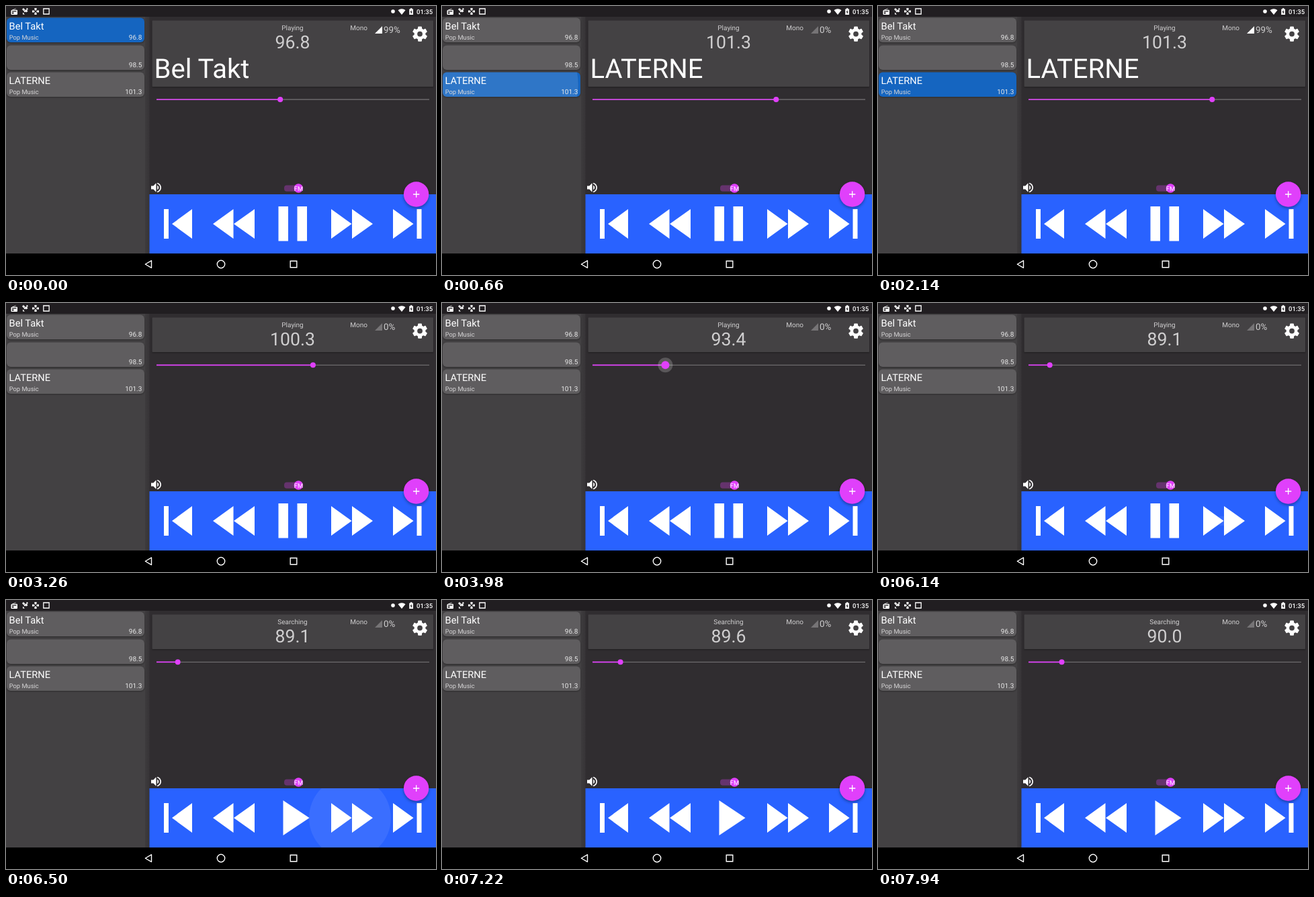
An HTML page for the animation above (8000 ms loop, 640 by 400 pixels).

```html
<!DOCTYPE html>
<html lang="en">
<head>
<meta charset="utf-8">
<title>Radio tuner</title>
<style>
  html, body { margin: 0; width: 100%; height: 100%; overflow: hidden; background: #000; }
  svg { display: block; width: 640px; height: 400px; font-family: Roboto, sans-serif; text-rendering: geometricPrecision; }
  .shadow { filter: drop-shadow(0 1px 1px rgba(0, 0, 0, .35)); }
</style>
</head>
<body>
<svg viewBox="0 0 640 400">
  <defs>
    <linearGradient id="edge">
      <stop offset="0" stop-color="#3d3b3d"/><stop offset="1" stop-color="#373437"/>
    </linearGradient>
    <clipPath id="barClip"><rect x="213" y="280" width="427" height="88"/></clipPath>
    <clipPath id="cardClip"><rect x="1" y="98.5" width="205" height="36.5" rx="6"/></clipPath>
  </defs>

  <rect width="640" height="400" fill="#302d30"/>
  <rect y="16" width="207" height="352" fill="#434143"/>
  <rect x="207" y="16" width="6.5" height="352" fill="url(#edge)"/>

  <!-- Status bar -->
  <rect width="640" height="16" fill="#211e21"/>
  <g fill="#fff">
    <path d="M8 6.2 14.5 3.4 14.8 4.1 10.8 5.8H16a1 1 0 0 1 1 1V12a1 1 0 0 1-1 1H8.500a1 1 0 0 1-1-1V7z"/>
    <circle cx="10.200" cy="10.500" r="1.300" fill="#211e21"/>
    <path d="M9 7.200h6.500v1.300H9z" fill="#211e21"/>
    <path d="M24 5l2-2 2.500 2.500-2 2zM28 7l2-2 2.500 2.500-2 2zM26.500 8l1.500-1.500 1.500 1.500L28 9.500zM30 4l1.500-1 1.500 1.500-1.500 1.500zM25 9.500l3 3h-3z"/>
    <path d="M42.400 3h3.200v2.500L44 7l-1.600-1.500zM42.400 13h3.200v-2.500L44 9l-1.600 1.500zM39 6.400v3.200h2.500L43 8l-1.500-1.600zM49 6.400v3.200h-2.500L45 8l1.500-1.600z"/>
    <path d="M55.800 4h8.400v8h-8.400z" fill="none" stroke="#fff" stroke-width="1.300"/>
    <circle cx="576" cy="8" r="2.800"/>
    <path d="M589 13 583.500 6.200a8.600 8.600 0 0 1 11 0z"/>
    <path d="M600.200 4.500h1.700V3.300h2.400v1.200H606V13h-5.800z"/>
    <path d="M603.500 6l-2 3.200h1.300V12l2-3.400h-1.300z" fill="#211e21"/>
    <text x="611" y="12" font-size="9.5" font-weight="500">01:35</text>
  </g>

  <g id="list"></g>
  <circle id="cardRipple" cx="100" cy="117" fill="#fff" clip-path="url(#cardClip)"/>

  <!-- Now playing -->
  <rect id="panel" class="shadow" x="217.500" y="21.500" width="418.500" rx="1" fill="#444244"/>
  <g fill="#cfcecf" font-size="10">
    <text id="state" x="426.500" y="36" text-anchor="middle"></text>
    <text x="512.300" y="36">Mono</text>
    <text id="frequency" x="426.500" y="63" font-size="26.67" text-anchor="middle"></text>
    <text id="percent" x="562" y="39.500" font-size="13.33"></text>
  </g>
  <path id="signal" d="M549 41h11V30z"/>
  <text id="station" x="220.500" y="107" font-size="40" fill="#fff"></text>
  <path transform="translate(602.700 28.200) scale(1.111)" fill="#fff" d="M19.430 12.980c.04-.32.07-.64.07-.98s-.03-.66-.07-.98l2.110-1.650c.19-.15.24-.42.12-.64l-2-3.460c-.12-.22-.39-.3-.61-.22l-2.490 1c-.52-.4-1.080-.73-1.690-.98l-.38-2.650A.49.490 0 0 0 14 2h-4c-.25 0-.46.18-.49.42l-.38 2.650c-.61.25-1.170.59-1.690.98l-2.490-1c-.23-.09-.49 0-.61.22l-2 3.460c-.13.22-.07.49.12.64l2.110 1.650c-.04.32-.07.65-.07.98s.03.66.07.98l-2.110 1.650c-.19.15-.24.42-.12.64l2 3.460c.12.22.39.3.61.22l2.490-1c.52.4 1.080.73 1.690.98l.38 2.650c.03.24.24.42.49.42h4c.25 0 .46-.18.49-.42l.38-2.650c.61-.25 1.170-.59 1.690-.98l2.490 1c.23.09.49 0 .61-.22l2-3.460c.12-.22.07-.49-.12-.64zM12 15.500a3.500 3.500 0 1 1 0-7 3.500 3.500 0 0 1 0 7z"/>

  <!-- Tuning slider -->
  <g id="slider">
    <path d="M224 0H630" stroke="#6c6a6c" stroke-width="1.300"/>
    <path id="progress" stroke="#e040fb" stroke-width="1.700"/>
    <g id="thumb">
      <circle id="halo" fill="#fff"/>
      <circle id="knob" fill="#e040fb"/>
    </g>
  </g>

  <!-- Volume and band switch -->
  <path transform="translate(213.500 260) scale(.8333)" fill="#fff" d="M3 9v6h4l5 5V4L7 9zm13.500 3c0-1.770-1.020-3.290-2.500-4.030v8.050c1.480-.73 2.500-2.250 2.500-4.020zM14 3.230v2.060c2.890.86 5 3.540 5 6.710s-2.110 5.850-5 6.710v2.060c4.010-.91 7-4.490 7-8.770s-2.990-7.860-7-8.770z"/>
  <rect x="414" y="266.400" width="27" height="9.400" rx="4" fill="#65336d"/>
  <circle cx="435.300" cy="271" r="6.700" fill="#e040fb"/>
  <text x="428.800" y="274.500" font-size="9.33" fill="#fff">FM</text>

  <!-- Transport controls -->
  <rect x="213.500" y="280" width="426.500" height="88" fill="#2962ff"/>
  <circle id="ripple" cx="512" cy="324" fill="#fff" clip-path="url(#barClip)"/>
  <g fill="#fff">
    <path d="M235 302h7v44h-7zM277 302v44l-30-22zM338.500 302v44l-30.500-22zM370 302v44l-31-22z"/>
    <path d="M484 302v44l30.500-22zM515 302v44l31-22zM576 302v44l30.500-22zM611.500 302h7v44h-7z"/>
    <path id="pause" d="M405.500 298H420v51.500h-14.500zM433.500 298H448v51.500h-14.500z"/>
    <path id="play" d="M412.500 298v52l39-26z"/>
  </g>
  <circle cx="610.600" cy="280" r="18.700" fill="#e040fb" style="filter:drop-shadow(0 2px 2px rgba(0,0,0,.35))"/>
  <path d="M606 280h9.300M610.650 275.300v9.400" stroke="#fff" stroke-width="1.300"/>

  <!-- Navigation bar -->
  <rect y="368" width="640" height="32"/>
  <g fill="none" stroke="#fff" stroke-width="1.400">
    <path d="M216.500 378.700v10.600L207.300 384z" stroke-linejoin="round"/>
    <circle cx="320" cy="384" r="5.700"/>
    <path d="M423.200 379.200h9.600v9.600h-9.600z"/>
  </g>
</svg>
<script>
const DURATION = 8000;
const SELECT = 620, SIGNAL_FOUND = 2140, UNTUNE = 3200, SEARCH = 6340;
const stations = [
  { name: "Bel Takt", genre: "Pop Music", mhz: 96.8, y: 17.5 },
  { name: "", genre: "", mhz: 98.5, y: 58.5 },
  { name: "LATERNE", genre: "Pop Music", mhz: 101.3, y: 98.5 },
];
const drag = [[3160, 101.3], [3260, 99.27], [3980, 92.98], [4640, 89.1]];
const searchSteps = [6580, 6820, 7020, 7180, 7220, 7380, 7620, 7780, 7940];
const TEXT_LAG = 50;

const $ = id => document.getElementById(id);
const set = (id, attrs) => { for (const k in attrs) $(id).setAttribute(k, attrs[k]); };
const setText = (id, text) => { if ($(id).textContent !== text) $(id).textContent = text; };
const ramp = (t, from, to) => Math.min(1, Math.max(0, (t - from) / (to - from)));
const easeOut = u => 1 - (1 - u) ** 2;

$("list").innerHTML = stations.map(({ name, genre, mhz, y }, i) => `
  <rect id="card${i}" class="shadow" x="1" y="${y}" width="205" height="36.5" rx="6"/>
  <text x="4.5" y="${y + 17.5}" font-size="14.67" fill="#fff">${name}</text>
  <text x="4.7" y="${y + 32}" font-size="9.33" fill="#d6d5d6">${genre}</text>
  <text x="202.300" y="${y + 32.3}" font-size="10" fill="#e8e8e8" text-anchor="end">${mhz.toFixed(1)}</text>`).join("");

function frequencyAt(t) {
  if (t < SELECT) return stations[0].mhz;
  if (t >= 5200) return 89.1 + searchSteps.filter(s => t >= s).length / 10;
  let value = drag[0][1];
  for (let i = 1; i < drag.length; i++) {
    const [t0] = drag[i - 1], [t1, target] = drag[i];
    value += (target - drag[i - 1][1]) * ramp(t, t0, t1);
  }
  return value;
}

function render(t) {
  const selected = t < SELECT ? 0 : t < UNTUNE ? 2 : -1;
  const tuned = selected >= 0;
  const searching = t >= SEARCH;
  const hasSignal = t < SELECT || (t >= SIGNAL_FOUND && tuned);
  const dragging = t > 3140 && t < 5200;

  stations.forEach((_, i) => set("card" + i, { fill: i === selected ? "#1565c0" : "#5f5d5f" }));
  set("cardRipple", { r: 110 * easeOut(ramp(t, 490, 720)), opacity: t < 500 ? 0 : .12 * (1 - ramp(t, 640, 900)) });

  set("panel", { height: tuned ? 98.5 : 51.5 });
  setText("station", tuned ? stations[selected].name : "");
  setText("state", searching ? "Searching" : "Playing");
  setText("frequency", frequencyAt(dragging ? t - TEXT_LAG : t).toFixed(1));
  setText("percent", hasSignal ? "99%" : "0%");
  set("signal", { fill: hasSignal ? "#fff" : "#767476" });

  const x = 224 + (frequencyAt(t) - 87.5) / 20.5 * 406;
  const press = ramp(t, 3260, 3460) * (1 - ramp(t, 4780, 5100));
  set("slider", { transform: `translate(0 ${tuned ? 139 : 92.3})` });
  set("progress", { d: `M224 0H${x}` });
  set("thumb", { transform: `translate(${x} 0)` });
  set("halo", { r: 4 + 7 * press, opacity: .2 * press });
  set("knob", { r: 4 + 2 * press });

  set("ripple", { r: 61 * easeOut(ramp(t, 6120, 6460)), opacity: t < 6140 ? 0 : .08 * (1 - ramp(t, 6540, 6900)) });
  set("pause", { visibility: searching ? "hidden" : "visible" });
  set("play", { visibility: searching ? "visible" : "hidden" });
}

const start = performance.now();
function tick() {
  render((performance.now() - start) % DURATION);
  requestAnimationFrame(tick);
}
tick();
</script>
</body>
</html>
```
